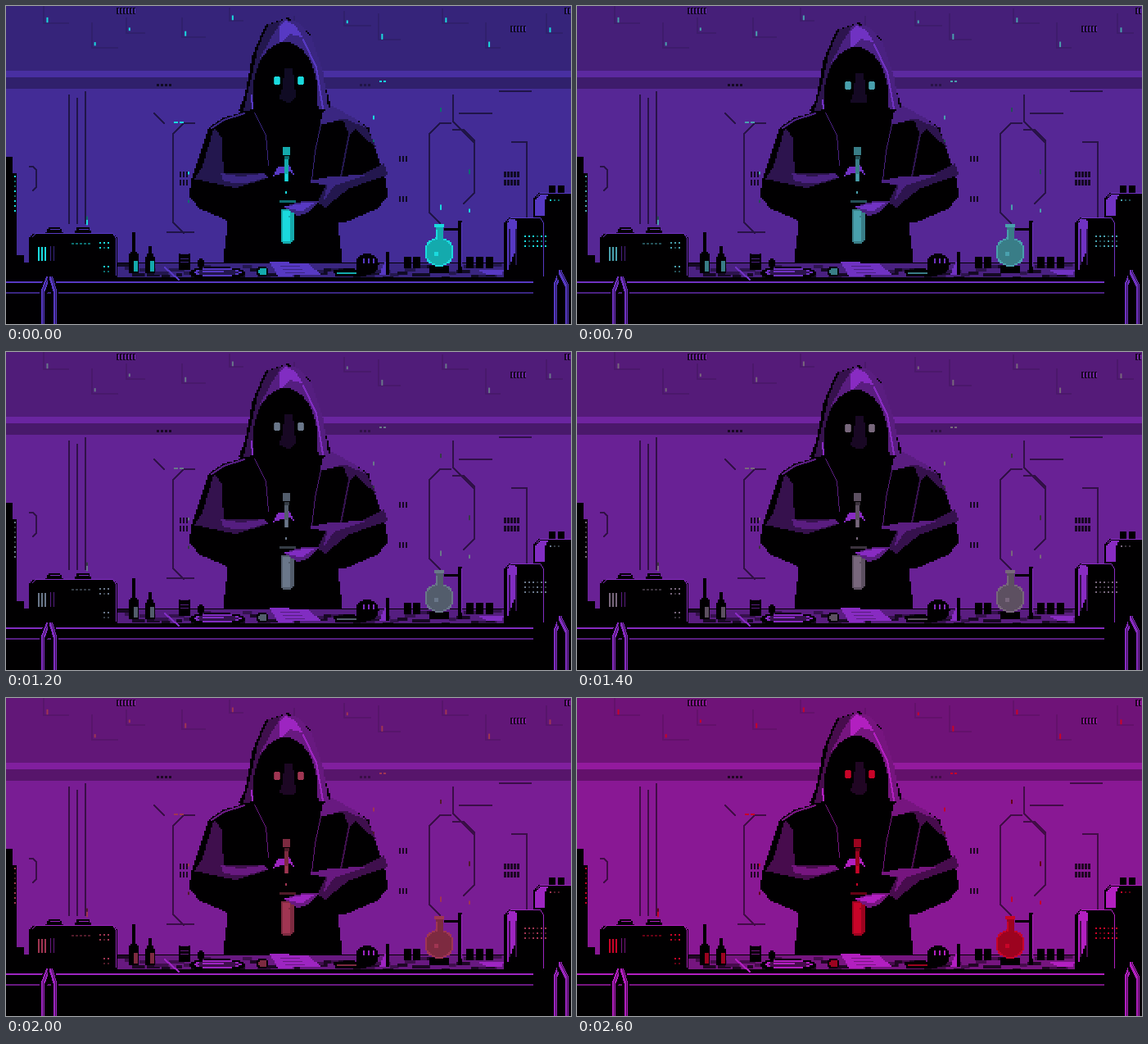
Write an HTML page with a canvas that moves like this. It is 690x388 px and loops after 2.7 s.

```html
<!DOCTYPE html>
<html lang="en">
<head>
<meta charset="utf-8">
<title>Hooded alchemist</title>
<style>
html, body { margin: 0; width: 100%; height: 100%; overflow: hidden; background: #000; }
canvas { display: block; width: 100vw; height: 100vh; image-rendering: pixelated; }
</style>
</head>
<body>
<canvas id="stage" width="690" height="388"></canvas>
<script>
const W = 690, H = 388, LOOP = 2700, STEP = 100, CELL = 2;
const ctx = document.getElementById('stage').getContext('2d');
const snap = v => Math.round(v / CELL) * CELL;

const wallFrom = [67, 44, 150], wallTo = [137, 24, 148];
const glowFrom = [26, 218, 222], glowTo = [200, 4, 40];

// Tints of the two base colours: wall purple and glowing liquid.
const wallTints = { wall: 1, strip: 1.07, upper: .81, band: .72, seam: .48, dark: .52, deep: .24, mid: .86, light: 1.3, black: .01 };
const glowTints = { glow: 1, liquid: .78, dim: .5 };
let color = {};

function setPalette(p) {
  const blend = (from, to, tints) => {
    for (const name in tints)
      color[name] = `rgb(${from.map((v, i) => Math.round((v + (to[i] - v) * p) * tints[name]))})`;
  };
  blend(wallFrom, wallTo, wallTints);
  blend(glowFrom, glowTo, glowTints);
}

function seeded(seed) {
  const next = () => (seed = seed * 16807 % 2147483647) / 2147483647;
  return (min, max) => min + next() * (max - min);
}

function box(c, x, y, w, h) {
  ctx.fillStyle = color[c];
  ctx.fillRect(x, y, w, h);
}

function bars(c, x, y, n, gap, w, h) {
  for (let i = 0; i < n; i++) box(c, x + i * gap, y, w, h);
}

// Scanline fill on a coarse grid keeps the stepped pixel edges.
function poly(c, pts) {
  const n = pts.length, ys = pts.filter((_, i) => i % 2);
  for (let y = snap(Math.min(...ys)); y < Math.max(...ys); y += CELL) {
    const mid = y + CELL / 2, xs = [];
    for (let i = 0; i < n; i += 2) {
      const x1 = pts[i], y1 = pts[i + 1], x2 = pts[(i + 2) % n], y2 = pts[(i + 3) % n];
      if ((y1 <= mid) !== (y2 <= mid)) xs.push(x1 + (mid - y1) / (y2 - y1) * (x2 - x1));
    }
    xs.sort((a, b) => a - b);
    for (let i = 0; i + 1 < xs.length; i += 2)
      box(c, snap(xs[i]), y, snap(xs[i + 1]) - snap(xs[i]), CELL);
  }
}

function line(c, pts, w = 2) {
  for (let i = 0; i + 3 < pts.length; i += 2) {
    const dx = pts[i + 2] - pts[i], dy = pts[i + 3] - pts[i + 1];
    const n = Math.max(1, Math.abs(dx), Math.abs(dy));
    for (let k = 0; k <= n; k++)
      box(c, Math.round(pts[i] + dx * k / n), Math.round(pts[i + 1] + dy * k / n), w, w);
  }
}

function ellipse(c, cx, cy, rx, ry) {
  for (let y = snap(cy - ry); y < cy + ry; y += CELL) {
    const half = rx * Math.sqrt(Math.max(0, 1 - ((y + 1 - cy) / ry) ** 2));
    box(c, snap(cx - half), y, snap(cx + half) - snap(cx - half), CELL);
  }
}

const mirror = pts => pts.map((v, i) => i % 2 ? v : W - v);

// A wall pipe with both ends bent 45 degrees towards `side`.
function pipe(x, top, bottom, side, bend = 13) {
  line('seam', [x + side * bend * 2, top, x + side * bend, top, x, top + bend,
    x, bottom - bend, x + side * bend, bottom]);
}

function drawWall() {
  const rnd = seeded(41);
  box('wall', 0, 0, W, H);
  box('upper', 0, 0, W, 79);
  box('strip', 0, 79, W, 8);
  box('band', 0, 87, W, 14);

  for (let x = 20; x < W; x += 62) {
    const y = rnd(0, 20), drop = y + rnd(12, 32), left = x + rnd(0, 26);
    line('band', [left, y, left, drop, left + rnd(14, 34), drop]);
    box('glow', left + 4, drop - 6, 2, rnd(3, 7));
  }
  for (let x = 76; x < 100; x += 10) line('seam', [x, 104 + x % 3 * 4, x, 264]);
  pipe(36, 195, 224, -1, 4);
  pipe(203, 142, 276, 1);
  pipe(516, 142, 264, 1);
  pipe(571, 150, 240, -1);
  line('seam', [545, 108, 545, 140, 571, 166]);
  line('seam', [617, 165, 635, 165, 635, 256]);
  line('seam', [553, 130, 592, 130]);
  line('seam', [196, 275, 228, 275]);
  line('seam', [180, 130, 192, 142]);
  line('seam', [602, 103, 640, 103]);

  for (const [x, y, n] of [[135, 2, 6], [616, 24, 5], [682, 2, 2]]) {
    bars('deep', x, y, n, 4, 3, 8);
    bars('light', x + 2, y + 1, n, 4, 1, 6);
  }
  bars('deep', 184, 95, 4, 5, 3, 3);
  bars('seam', 432, 95, 3, 5, 3, 3);
  for (const y of [183, 232]) bars('deep', 480, y, 3, 4, 2, 7);
  for (const y of [202, 212]) {
    bars('deep', 608, y, 5, 4, 3, 7);
    bars('deep', 212, y, 3, 4, 2, 7);
  }
  for (const x of [98, 222, 448, 530, 565])
    for (let i = 0; i < 2; i++) box(i ? 'dim' : 'glow', x, rnd(120, 290), 2, rnd(3, 7));
  bars('glow', 205, 141, 2, 7, 5, 2);
  bars('glow', 456, 91, 2, 5, 3, 2);
}

function drawHead(dy) {
  // Only the upper part bobs; the hem stays on the shoulders.
  const bob = pts => pts.map((v, i) => i % 2 && v < 114 ? v + dy : v);
  poly('black', bob([344, 14, 317, 23, 301, 60, 292, 108, 284, 128, 300, 138, 384, 148, 398, 126, 390, 98, 372, 34]));
  poly('dark', bob([344, 15, 320, 23, 308, 50, 299, 90, 290, 128, 302, 136, 345, 60]));
  poly('mid', bob([338, 16, 358, 20, 374, 40, 387, 80, 394, 126, 384, 146, 376, 80, 345, 44, 310, 64, 324, 38]));
  poly('light', bob([334, 24, 342, 18, 354, 24, 362, 38, 347, 34, 333, 47]));
  line('light', bob([362, 40, 378, 74, 386, 124]));
  line('light', bob([299, 108, 300, 126, 304, 135]));

  ellipse('black', 341, 110 + dy, 40, 66);
  poly('black', [301, 112, 381, 112, 380, 180, 306, 180]);
  poly('deep', bob([340, 76, 350, 76, 354, 112, 346, 119, 333, 112, 338, 100]));
  for (const x of [331, 360]) {
    box('liquid', x - 4, 87 + dy, 8, 8);
    box('glow', x - 3, 86 + dy, 6, 10);
  }
}

function drawBody() {
  const arm = [302, 126, 264, 137, 247, 149, 238, 178, 226, 212, 224, 232, 236, 247, 276, 264, 345, 264, 345, 130];
  poly('black', arm);
  poly('black', mirror(arm));
  poly('black', [272, 254, 265, 314, 411, 314, 404, 254]);

  // Left sleeve and forearm
  poly('dark', [254, 148, 263, 160, 266, 204, 315, 204, 320, 210, 280, 222, 230, 211, 240, 196]);
  poly('mid', [262, 204, 286, 208, 316, 204, 320, 209, 290, 217, 266, 214]);
  line('mid', [250, 148, 265, 138, 290, 130]);
  line('mid', [303, 130, 317, 158, 320, 194], 1);

  // Right shoulder, sleeve and forearm
  poly('dark', [398, 126, 440, 147, 453, 174, 426, 150, 419, 157, 412, 140, 386, 140]);
  poly('mid', [386, 130, 398, 122, 424, 136, 442, 150, 414, 137, 384, 145]);
  line('mid', [384, 144, 377, 177, 373, 212], 1);
  line('dark', [418, 156, 408, 207]);
  poly('dark', [372, 214, 427, 209, 462, 192, 466, 206, 418, 223, 390, 246, 380, 240, 391, 218]);
  poly('mid', [366, 214, 396, 208, 440, 206, 400, 220, 387, 240, 392, 219]);
}

function drawVial() {
  box('liquid', 338, 172, 9, 10);
  box('dim', 340, 183, 6, 4);
  poly('light', [326, 208, 332, 197, 346, 193, 352, 206, 345, 201, 330, 206]);
  box('liquid', 340, 187, 5, 27);
  box('glow', 341, 205, 3, 9);
  box('glow', 341, 226, 2, 3);
  box('dim', 334, 237, 20, 3);
  poly('liquid', [336, 248, 351, 248, 351, 286, 347, 291, 340, 291, 336, 286]);
  box('glow', 338, 250, 9, 37);
  bars('liquid', 345, 256, 1, 1, 4, 2);
  poly('mid', [339, 245, 363, 238, 383, 237, 370, 252, 356, 256]);
  poly('light', [340, 245, 364, 240, 378, 239, 360, 251]);
}

function drawDesk() {
  const rnd = seeded(7);
  box('black', 0, 313, W, 75);
  box('mid', 134, 314, 476, 20);
  for (let x = 136; x < 600; x += 9)
    box(x % 2 ? 'dark' : 'deep', x, snap(rnd(314, 330)), rnd(6, 24), 4);
  box('black', 134, 331, 476, 3);
  box('light', 0, 336, 650, 2);
  box('mid', 0, 349, 650, 2);
}

function bottle(x, top, neck) {
  box('black', x + 4, top, 4, 30);
  poly('black', [x + 3, neck, x + 9, neck, x + 12, neck + 5, x + 12, 327, x, 327, x, neck + 5]);
  box('liquid', x + 6, 311, 5, 13);
}

function drawFlask(x, y) {
  box('black', x - 12, y + 17, 24, 9);
  box('black', x + 23, y - 38, 5, 64);
  box('black', x + 6, y - 29, 20, 3);
  box('light', x + 27, y - 36, 1, 54);
  ellipse('glow', x, y, 18, 18);
  ellipse('liquid', x, y, 16, 16);
  box('liquid', x - 4, y - 31, 9, 18);
  box('glow', x - 6, y - 34, 12, 4);
  box('glow', x - 4, y - 27, 2, 12);
  box('glow', x - 6, y, 5, 5);
}

function drawTableware() {
  bottle(150, 276, 299);
  bottle(170, 293, 302);
  box('black', 211, 302, 14, 20);
  for (const y of [302, 308, 312]) box('mid', 213, y, 10, 1);
  line('light', [193, 318, 210, 333]);
  ellipse('black', 238, 314, 5, 6);

  ellipse('black', 258, 326, 35, 8);
  ellipse('light', 258, 325, 29, 5);
  ellipse('dark', 258, 325, 25, 4);
  box('light', 240, 323, 26, 2);
  ellipse('black', 313, 324, 8, 7);
  ellipse('liquid', 313, 324, 5, 5);

  poly('light', [322, 312, 368, 314, 384, 327, 332, 330]);
  for (let i = 0; i < 3; i++) box('mid', 335 + 3 * i, 317 + 4 * i, 24, 1);
  poly('black', [400, 322, 424, 320, 440, 329, 402, 330]);
  box('liquid', 404, 325, 24, 2);
  ellipse('black', 441, 315, 14, 13);
  bars('light', 436, 308, 3, 6, 2, 6);
  poly('light', [456, 328, 464, 309, 468, 328]);
  box('black', 464, 300, 4, 28);
  for (const x of [486, 497, 562, 574, 586]) box('black', x, 306, 9, 14);
  poly('light', [574, 321, 608, 321, 604, 329, 588, 328]);
  drawFlask(529, 300);
}

function hose(x, top, lean) {
  const path = [x, H, x, top + 16, x + lean, top];
  line('black', path.map((v, i) => i % 2 ? v : v - 2), 8);
  line('light', path, 4);
  line('dark', path.map((v, i) => i % 2 ? v : v + 2), 1);
}

function lamps(x, y, cols, rows, seed) {
  const rnd = seeded(seed);
  for (let r = 0; r < rows; r++)
    for (let c = 0; c < cols; c++)
      box(rnd(0, 1) < .5 ? 'glow' : 'dim', x + c * 5, y + r * 6, 2, 2);
}

function cabinet(x, y, w, h) {
  poly('black', [x, y + 6, x + 6, y, x + w - 6, y, x + w, y + 6, x + w, y + h, x, y + h]);
  line('light', [x + 4, y + 4, x + 8, y, x + w - 6, y, x + w - 2, y + 6, x + w - 2, y + h - 6], 1);
}

function drawMachines() {
  box('black', 0, 184, 8, 152);
  box('black', 8, 204, 5, 132);
  box('black', 12, 304, 10, 31);
  lamps(10, 207, 1, 8, 5);

  for (const x of [48, 83]) {
    poly('black', [x, 278, x + 4, 270, x + 18, 270, x + 22, 278]);
    box('light', x + 6, 272, 12, 1);
  }
  cabinet(28, 277, 108, 57);
  bars('glow', 39, 294, 3, 4, 2, 17);
  bars('mid', 54, 293, 2, 4, 1, 18);
  bars('dim', 80, 289, 5, 5, 3, 2);
  lamps(114, 288, 3, 2, 11);
  lamps(119, 317, 2, 2, 17);

  bars('black', 663, 219, 2, 11, 8, 10);
  cabinet(644, 228, 52, 160);
  poly('light', [645, 238, 655, 229, 664, 229, 657, 238, 657, 257, 645, 257]);
  cabinet(608, 258, 50, 77);
  poly('light', [611, 266, 616, 259, 624, 262, 621, 302, 611, 326]);
  bars('dark', 614, 272, 2, 8, 2, 44);
  lamps(633, 280, 6, 3, 23);
  lamps(664, 236, 3, 1, 29);

  hose(43, 330, 6);
  hose(58, 330, -5);
  hose(669, 322, 6);
  hose(683, 324, -8);
}

function draw(frame) {
  setPalette(frame / (LOOP / STEP - 1));
  const sway = Math.sin((frame * STEP + 40) * Math.PI / 1200) ** 2;
  drawWall();
  drawHead(snap(5.9 * sway));
  drawBody();
  drawVial();
  drawDesk();
  drawTableware();
  drawMachines();
}

let shown = -1;
function tick() {
  const frame = Math.floor(performance.now() % LOOP / STEP);
  if (frame !== shown) draw(shown = frame);
  requestAnimationFrame(tick);
}
tick();
</script>
</body>
</html>
```
